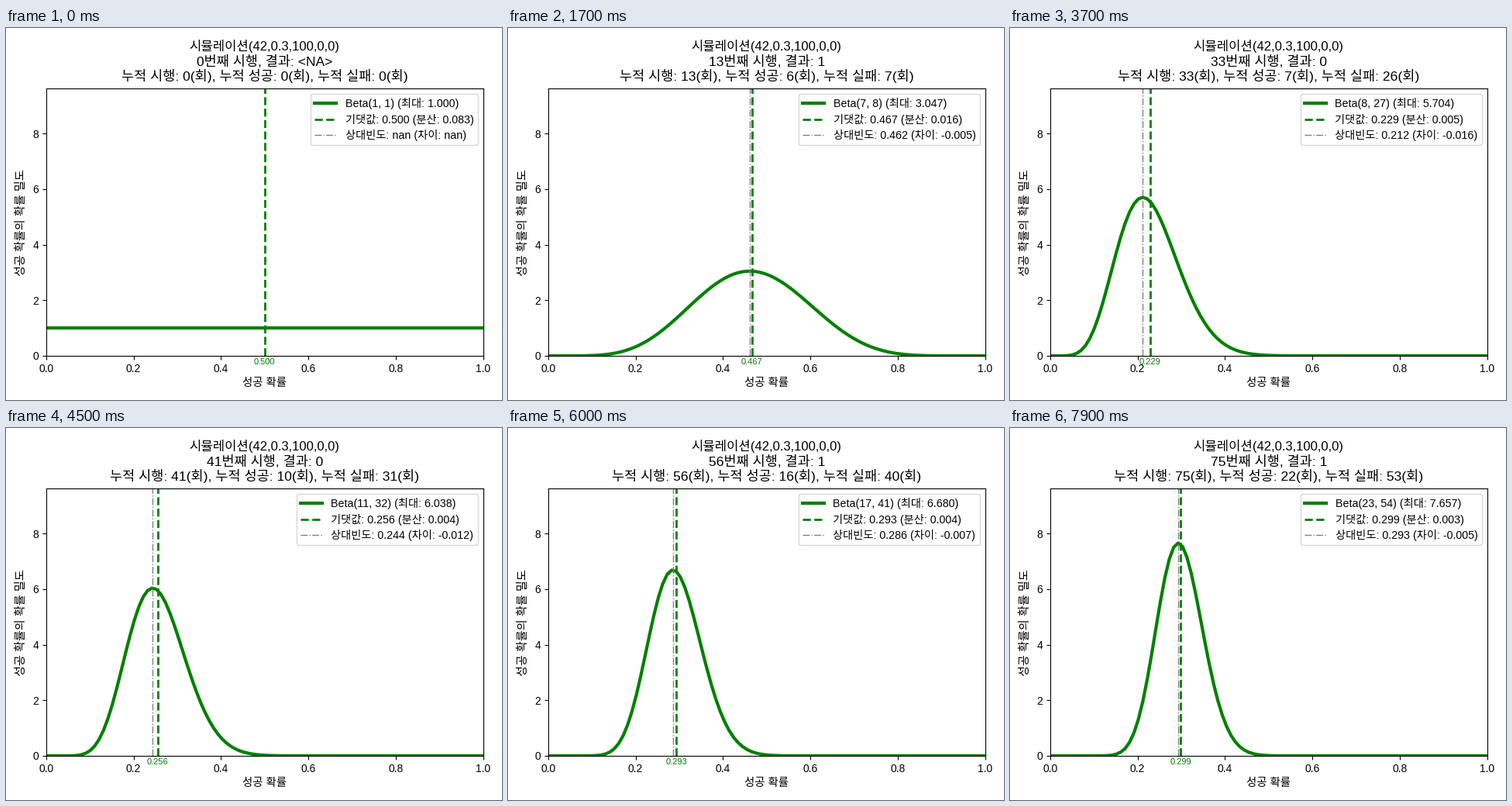
A matplotlib script that plays this animation: 640 by 480 pixels, repeating every 8 s.

```python
import math

import matplotlib.pyplot as plt
import numpy as np
from matplotlib.animation import FuncAnimation

W, H, DPI = 640, 480, 100
SEED, PROB, TRIALS = 42, 0.3, 100
FRAMES, STEP, HOLD = 80, 100, 4
LEFT, RIGHT, TOP, BOTTOM = 51.7, 615.7, 78, 423

plt.rcParams.update({
    "font.family": ["Liberation Sans", "Noto Sans CJK JP"],
    "font.size": 10,
})

results = np.random.RandomState(SEED).binomial(1, PROB, TRIALS)
wins = np.concatenate([[0], np.cumsum(results)])
grid = np.linspace(0, 1, 100)


def beta_pdf(a, b):
    scale = math.gamma(a + b) / math.gamma(a) / math.gamma(b)
    return scale * grid ** (a - 1) * (1 - grid) ** (b - 1)


def density(n):
    return beta_pdf(wins[n] + 1, n - wins[n] + 1)


fig = plt.figure(figsize=(W / DPI, H / DPI), dpi=DPI, facecolor="white")
ax = fig.add_axes([LEFT / W, 1 - BOTTOM / H,
                   (RIGHT - LEFT) / W, (BOTTOM - TOP) / H])
ax.set_xlim(0, 1)
ax.set_ylim(0, 1.1 * max(density(n).max() for n in range(TRIALS + 1)))


def put(x, y, text="", **style):
    """Centred text with its baseline y pixels below the top edge."""
    return fig.text(x / W, 1 - y / H, text, ha="center", **style)


mid = (LEFT + RIGHT) / 2
put(mid, 29, f"시뮬레이션({SEED},{PROB},{TRIALS},0,0)", size=12)
trial_text = put(mid, 48.6, size=12.6)
total_text = put(mid, 68.4, size=12.6)
put(mid, 462, "성공 확률", size=10.4)
put(20, 251, "성공 확률의 확률 밀도", size=10.9, rotation=90, va="center")
mean_text = put(mid, 434, size=8, color="g")

curve, = ax.plot(grid, density(0), color="g", lw=3, label="-")
mean_line = ax.axvline(0.5, color="g", ls="--", lw=2, label="-")
freq_line = ax.axvline(np.nan, color="gray", ls="-.", lw=1, label="-")
legend = ax.legend(loc="upper right", fontsize=10.25, handlelength=1.95,
                   labelspacing=0.37, borderpad=0.36)


def draw(frame):
    n = max(0, frame - HOLD)
    s = int(wins[n])
    a, b = s + 1, n - s + 1
    mean = a / (a + b)
    var = mean * (1 - mean) / (a + b + 1)
    freq = s / n if n else math.nan
    pdf = density(n)

    curve.set_ydata(pdf)
    mean_line.set_xdata([mean, mean])
    freq_line.set_xdata([freq, freq])
    mean_text.set_x((LEFT + mean * (RIGHT - LEFT)) / W)
    mean_text.set_text(f"{mean:.3f}")

    result = results[n - 1] if n else "<NA>"
    trial_text.set_text(f"{n}번째 시행, 결과: {result}")
    total_text.set_text(
        f"누적 시행: {n}(회), 누적 성공: {s}(회), 누적 실패: {n - s}(회)")
    rows = (f"Beta({a}, {b}) (최대: {pdf.max():.3f})",
            f"기댓값: {mean:.3f} (분산: {var:.3f})",
            f"상대빈도: {freq:.3f} (차이: {freq - mean:.3f})")
    for label, row in zip(legend.get_texts(), rows):
        label.set_text(row)


anim = FuncAnimation(fig, draw, frames=FRAMES, interval=STEP,
                     init_func=lambda: draw(0), repeat=True, repeat_delay=0)
plt.show()
```
